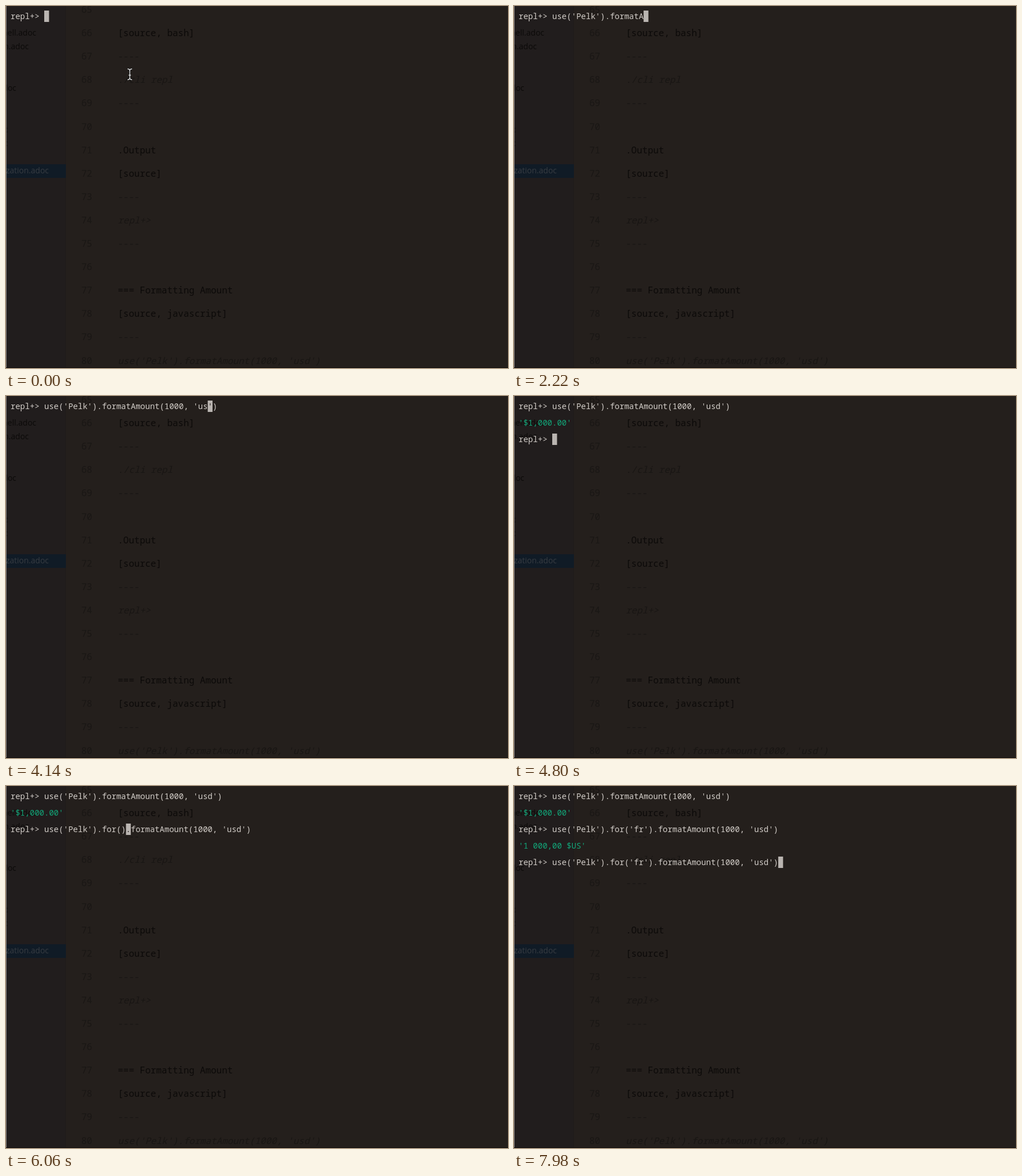
These frames come from a looping animation (880 by 636 pixels, 8000 ms). An HTML page with a canvas:

```html
<!DOCTYPE html>
<html lang="en">
<head>
<meta charset="utf-8">
<title>Terminal session</title>
<style>
  html, body { margin: 0; width: 100%; height: 100%; overflow: hidden; background: #241f1c; }
  canvas { display: block; width: 880px; height: 636px; }
</style>
</head>
<body>
<canvas id="stage" width="880" height="636"></canvas>
<script>
const ctx = document.getElementById('stage').getContext('2d');
const LOOP = 8000, TICK = 60;
const MONO = '"Noto Sans Mono", monospace';
const SANS = '"Open Sans", sans-serif';
const CELL = 8.43, ROW = 29, LEFT = 8;
const PROMPT = 'repl+> ';
const RESULTS = ["'$1,000.00'", "'1 000,00 $US'"];

const BG = '#241f1c', INK = '#0c0a09', DIM = '#191614', NUMBER = '#1a1715';
const TEXT = '#d2cdc8', CURSOR = '#bab5b1', GREEN = '#12a679';

// Key strokes spread evenly between two times; arrows move, ↑ recalls, ⏎ runs.
const BURSTS = [
  [120, 1000, "use()←''←Pel"],
  [1090, 2200, 'k→→.formatA'],
  [2300, 3460, 'mount()←1000,'],
  [3560, 4480, " ''←usd→→⏎"],
  [4920, 4920, '↑'],
  [5000, 5500, '←'.repeat(26)],
  [5590, 6040, '.for()'],
  [6140, 6560, "←''←fr"],
  [6960, 6960, '⏎'],
  [7560, 7560, '↑']
];

const KEYS = BURSTS.flatMap(([from, to, keys]) =>
  [...keys].map((key, i) => ({
    key,
    at: from + (to - from) * i / Math.max(1, keys.length - 1)
  })));

// Lines of the document behind the glass, starting at number 65.
const DOC = [
  '', '[source, bash]', '----', '/./cli repl', '----', '',
  '.Output', '[source]', '----', '/repl+>', '----', '',
  '=== Formatting Amount', '[source, javascript]', '----',
  "/use('Pelk').formatAmount(1000, 'usd')"
];

const FILES = [
  ['shell.adoc', 53, 47], ['n.adoc', 40, 71], ['doc', 18, 144],
  ['c', 3, 217], ['c', 3, 241]
];

function label(text, x, y, color, font, align = 'left') {
  ctx.font = font;
  ctx.fillStyle = color;
  ctx.textAlign = align;
  ctx.fillText(text, x, y);
}

function box(x, y, w, h, color) {
  ctx.fillStyle = color;
  ctx.fillRect(x, y, w, h);
}

function sessionAt(time) {
  const log = [], past = [];
  let line = '', pos = 0;
  for (const { key, at } of KEYS) {
    if (at > time) break;
    if (key === '←') pos--;
    else if (key === '→') pos++;
    else if (key === '↑') {
      line = past[past.length - 1];
      pos = line.length;
    } else if (key === '⏎') {
      log.push([PROMPT + line, TEXT], [RESULTS[past.length], GREEN]);
      past.push(line);
      line = '';
      pos = 0;
    } else {
      line = line.slice(0, pos) + key + line.slice(pos);
      pos++;
    }
  }
  log.push([PROMPT + line, TEXT]);
  return { log, line, pos };
}

function drawBackdrop() {
  box(0, 0, 880, 636, BG);
  box(0, 0, 105, 636, '#211d1d');
  box(104, 0, 1, 636, '#1e1a1a');

  for (const [name, x, y] of FILES) label(name, x, y + 5, INK, '14px ' + SANS, 'right');
  box(0, 278, 105, 24, '#101b26');
  label('zation.adoc', 75, 294, '#373c42', '14px ' + SANS, 'right');

  DOC.forEach((entry, i) => {
    const y = 12 + i * 41.1;
    const italic = entry[0] === '/';
    const faint = italic || entry === '----';
    label(65 + i, 132, y, NUMBER, '16px ' + MONO);
    label(italic ? entry.slice(1) : entry, 196, y, faint ? DIM : INK,
      (italic ? 'italic ' : '') + '16px ' + MONO);
  });

  box(0, 0, 1, 636, '#8a8582');
  box(0, 635, 880, 1, '#0d0b0a');
}

function drawTerminal({ log, line, pos }) {
  const font = '14.05px ' + MONO;
  log.forEach(([text, color], row) => label(text, LEFT, 23 + row * ROW, color, font));

  const row = log.length - 1;
  const x = LEFT + (PROMPT.length + pos) * CELL;
  box(x, 8 + row * ROW, CELL, 20, CURSOR);
  label(line[pos] || '', x, 23 + row * ROW, BG, font);
}

function drawPointer() {
  const path = new Path2D('M213 110.5 Q217 110.5 217 114 V126 Q217 129.5 213 129.5 M221 110.5 Q217 110.5 217 114 M217 126 Q217 129.5 221 129.5 M215 121.5 H219');
  ctx.strokeStyle = '#111';
  ctx.lineWidth = 3;
  ctx.stroke(path);
  ctx.strokeStyle = '#ddd';
  ctx.lineWidth = 1.4;
  ctx.stroke(path);
}

function frame(now) {
  const time = Math.floor((now % LOOP) / TICK) * TICK;
  drawBackdrop();
  drawTerminal(sessionAt(time));
  if (time < KEYS[0].at) drawPointer();
  requestAnimationFrame(frame);
}

requestAnimationFrame(frame);
</script>
</body>
</html>
```
